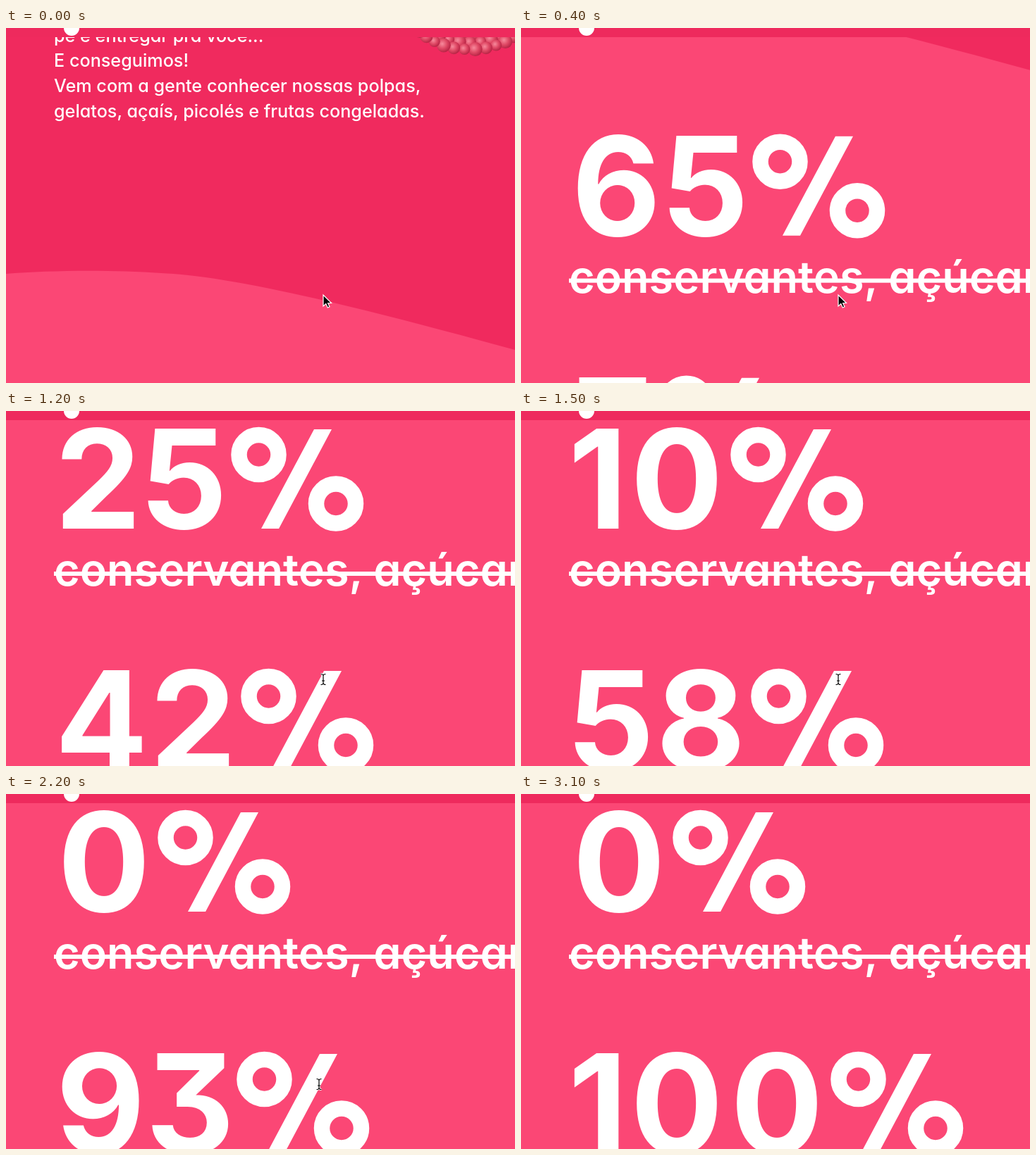
Animation of 722x504 px, one loop 3200 ms. Source, as an HTML page:

```html
<!DOCTYPE html>
<html lang="pt-BR">
<head>
<meta charset="utf-8">
<title>Frutas</title>
<style>
  html, body { margin: 0; width: 100%; height: 100%; overflow: hidden; background: #f02a5e; }
  svg { display: block; width: 722px; height: 504px; }
  /* single-storey a, flat-topped 3 */
  text { font-family: Inter, "Open Sans", sans-serif; font-feature-settings: "cv11", "cv09"; fill: #fff; }
  .copy { font-size: 25.2px; font-weight: 500; }
  .label { font-size: 63px; font-weight: 600; }
  .count text { font-size: 195px; font-weight: 700; text-anchor: middle; }
</style>
</head>
<body>
<svg viewBox="0 0 722 504">
  <defs>
    <radialGradient id="drupe" cx=".4" cy=".4" r=".6">
      <stop offset="0" stop-color="#f78a9c"/>
      <stop offset=".55" stop-color="#e04a66"/>
      <stop offset="1" stop-color="#b92546"/>
    </radialGradient>
    <g id="percent">
      <g fill="none" stroke="#fff" stroke-width="22.5">
        <circle cx="44.5" cy="-105" r="28"/>
        <circle cx="154" cy="-35.5" r="28"/>
      </g>
      <path d="M123 -141H148L73 0H48Z" fill="#fff"/>
    </g>
    <path id="stem" fill="none" d="M-3.5 -7.5Q0 -7.5 0 -5Q0 -7.5 3.5 -7.5M0 -5V5M-3.5 7.5Q0 7.5 0 5Q0 7.5 3.5 7.5M-2 2H2"/>
  </defs>
  <rect width="722" height="504" fill="#f02a5e"/>
  <g id="page">
    <g id="berry"><ellipse cx="658" cy="-25" rx="80" ry="58" fill="#c22f4e"/></g>
    <g class="copy">
      <text x="68" y="20">pé e entregar pra você...</text>
      <text x="68" y="55">E conseguimos!</text>
      <text x="68" y="91">Vem com a gente conhecer nossas polpas,</text>
      <text x="68" y="127">gelatos, açaís, picolés e frutas congeladas.</text>
    </g>
    <path fill="#fb4775" d="M0 349C60 344 150 343 220 348C340 353 560 413 722 457V1200H0Z"/>
    <g class="count" id="down" transform="translate(68 692)"><text/><use href="#percent"/></g>
    <text class="label" x="68" y="773">conservantes, açúcar e corantes</text>
    <rect x="68" y="753" width="700" height="6" fill="#fff"/>
    <g class="count" id="up" transform="translate(68 1035)"><text/><use href="#percent"/></g>
  </g>
  <rect width="722" height="13" fill="#ee2a5d"/>
  <circle cx="93" cy="0" r="11" fill="#fff"/>
  <g id="cursor">
    <path id="arrow" d="M0 -2V14L3.8 10.5L6.3 16L9 14.8L6.6 9.5H11.5Z" stroke="#fff" stroke-width="1.2"/>
    <g id="beam">
      <use href="#stem" stroke="#fff" stroke-width="3"/>
      <use href="#stem" stroke="#000" stroke-width="1.2"/>
    </g>
  </g>
</svg>
<script>
const LOOP = 3200, STEP = 100, SCROLL = 525;
const $ = id => document.getElementById(id);

// Slot width of the digits 0 to 9 in the big numbers
const SLOT = [142, 82, 125, 122, 135, 121, 134, 114, 132, 132];
const COUNT_UP = [[400, 3], [800, 23], [1200, 42], [1800, 73], [2200, 93], [2340, 100]];
const CURSOR_X = [[1900, 450], [2200, 444], [2600, 436]];
const CURSOR_Y = [[1900, 381], [2200, 412], [2600, 520]];

// Piecewise linear value, held at both ends
function track(points, t) {
  if (t <= points[0][0]) return points[0][1];
  for (let i = 1; i < points.length; i++) {
    const [t0, a] = points[i - 1], [t1, b] = points[i];
    if (t <= t1) return a + (b - a) * (t - t0) / (t1 - t0);
  }
  return points[points.length - 1][1];
}

function setCount(id, value) {
  const digits = String(Math.round(value));
  const [text, percent] = $(id).children;
  let x = 0;
  const centres = [...digits].map(d => {
    x += SLOT[d];
    return x - SLOT[d] / 2;
  });
  text.setAttribute('x', centres.join(' '));
  text.textContent = digits;
  percent.setAttribute('x', x);
}

function growBerry() {
  for (const [ring, n] of [[.58, 11], [.8, 14], [.97, 17]]) {
    for (let i = 0; i <= n; i++) {
      const a = Math.PI * i / n;
      const drupe = document.createElementNS('http://www.w3.org/2000/svg', 'circle');
      drupe.setAttribute('cx', 658 + 86 * ring * Math.cos(a));
      drupe.setAttribute('cy', -25 + 57 * ring * Math.sin(a));
      drupe.setAttribute('r', 8 + (i * 7 % 3));
      drupe.setAttribute('fill', 'url(#drupe)');
      $('berry').append(drupe);
    }
  }
}

function draw(t) {
  const scroll = SCROLL * (1 - Math.pow(1 - Math.min(t / 800, 1), 2.04));
  $('page').setAttribute('transform', `translate(0 ${-scroll})`);
  setCount('down', Math.max(0, 85 - t / 20));
  setCount('up', track(COUNT_UP, t));

  const overText = t >= 700;
  $('arrow').style.display = overText ? 'none' : '';
  $('beam').style.display = overText ? '' : 'none';
  $('cursor').setAttribute('transform', `translate(${track(CURSOR_X, t)} ${track(CURSOR_Y, t)})`);
}

growBerry();
const start = performance.now();
function tick() {
  const t = (performance.now() - start) % LOOP;
  draw(Math.floor(t / STEP) * STEP);
  requestAnimationFrame(tick);
}
tick();
</script>
</body>
</html>
```
